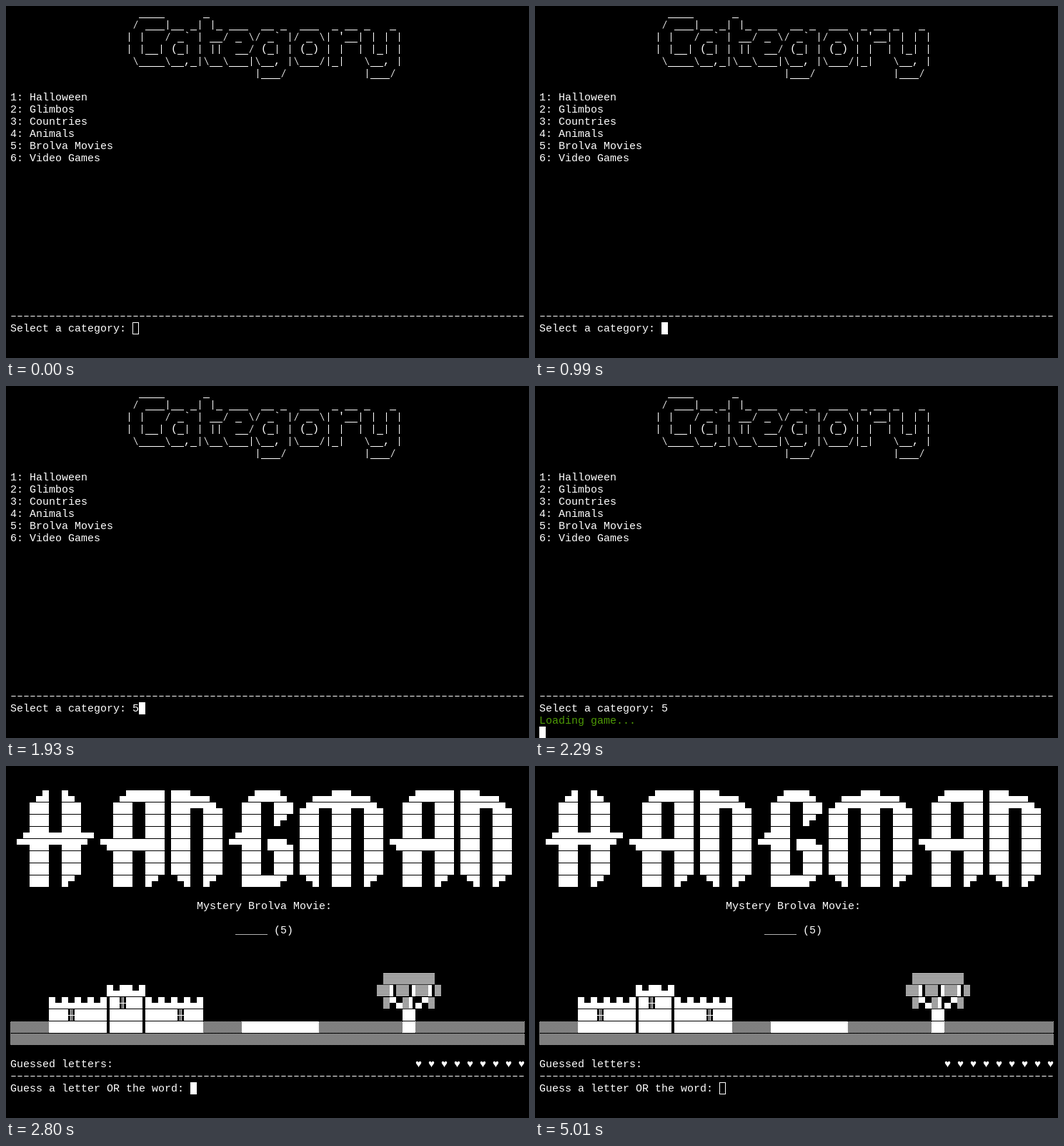
Recreate the animation shown at these times as an HTML page. Size 732 px wide and 492 px high, loop 5.13 s.

```html
<!DOCTYPE html>
<html lang="en">
<head>
<meta charset="utf-8">
<title>Hangman terminal</title>
<style>
  html, body { margin: 0; width: 100%; height: 100%; overflow: hidden; background: #000; }
  svg { display: block; }
  text { font: 15px "Liberation Mono", "Courier New", monospace; fill: #fff; white-space: pre; }
  .block, rect { shape-rendering: crispEdges; }
</style>
</head>
<body>
<svg id="stage" width="732" height="492" viewBox="0 0 732 492">
  <defs>
    <pattern id="ground" width="2" height="2" patternUnits="userSpaceOnUse">
      <path class="block" d="M0 0h1v1h-1zM1 1h1v1h-1z" fill="#fff"/>
    </pattern>
    <pattern id="leaves" width="2" height="2" patternUnits="userSpaceOnUse">
      <rect width="2" height="2" fill="#666"/>
      <path class="block" d="M0 0h2v1h-2z" fill="#ddd"/>
    </pattern>
  </defs>
  <rect width="732" height="492"/>
</svg>
<script>
const CELL_W = 9, CELL_H = 17, LEFT = 6, LOOP = 5130;
const stage = document.getElementById('stage');

function add(parent, tag, attrs = {}) {
  const node = document.createElementNS('http://www.w3.org/2000/svg', tag);
  for (const key in attrs) node.setAttribute(key, attrs[key]);
  return parent.appendChild(node);
}

function print(parent, col, row, content, fill = '#fff') {
  const node = add(parent, 'text', { x: LEFT + col * CELL_W, y: row * CELL_H + 13 });
  node.style.fill = fill;
  node.textContent = content;
  return node;
}

function rule(parent) {
  add(parent, 'path', { d: 'M7.4 433.5H726', stroke: '#fff', 'stroke-dasharray': '6.2 2.8' });
}

// Line-drawing characters as a start point and a relative line inside the cell.
const STROKES = {
  '_': [0, 16.5, 9, 0],
  '|': [4.5, 3, 0, 13],
  '/': [2, 14.5, 5, -11],
  '\\': [2, 3.5, 5, 11]
};

function drawBanner(parent, firstCol, lines) {
  let d = '';
  lines.forEach((line, row) => {
    [...line].forEach((char, col) => {
      if (!STROKES[char]) return;
      const [x, y, dx, dy] = STROKES[char];
      d += `M${LEFT + (firstCol + col) * CELL_W + x} ${row * CELL_H + y}l${dx} ${dy}`;
    });
    print(parent, firstCol, row, line.replace(/[_|/\\]/g, ' '));
  });
  add(parent, 'path', { d, stroke: '#fff', fill: 'none' });
}

// Each block character is a list of [x, y, width, height] inside its cell.
const BLOCKS = {
  '█': [[0, 0, 9, 16]],
  '▀': [[0, 0, 9, 8]],
  '▄': [[0, 8, 9, 8]],
  '▌': [[0, 0, 5, 16]],
  '▐': [[4, 0, 5, 16]],
  '╫': [[3, 0, 1, 16], [5, 0, 1, 16], [0, 8, 9, 1]],
  '░': [[0, 0, 9, 16]],
  '▒': [[0, 0, 9, 16]]
};
const FILLS = { '░': 'url(#ground)', '▒': 'url(#leaves)' };

function drawBlocks(parent, firstRow, lines) {
  const paths = {};
  lines.forEach((line, row) => [...line].forEach((char, col) => {
    const fill = FILLS[char] || '#fff';
    for (const [x, y, w, h] of BLOCKS[char] || []) {
      paths[fill] = (paths[fill] || '') +
        `M${LEFT + col * CELL_W + x} ${(firstRow + row) * CELL_H + y}h${w}v${h}h${-w}z`;
    }
  }));
  for (const fill in paths) add(parent, 'path', { class: 'block', d: paths[fill], fill });
}

const LETTERS = {
  H: ['   ▄█  █▄   ', '  ███  ███  ', '  ███  ███  ', ' ▄███▄▄███▄▄',
      '▀▀███▀▀███▀ ', '  ███  ███  ', '  ███  ███  ', '  ███  █▀   '],
  A: ['   ▄██████', '  ███  ███', '  ███  ███', '  ███  ███',
      '▀█████████', '  ███  ███', '  ███  ███', '  ███  █▀ '],
  N: ['███▄▄▄  ', '███▀▀██▄', ...Array(5).fill('███  ███'), ' ▀█  █▀ '],
  G: ['   ▄████▄ ', '  ███  ███', '  ███  █▀ ', ' ▄███     ',
      '▀▀███ ███▄', '  ███  ███', '  ███  ███', '  ██████▀ '],
  M: ['  ▄▄▄███▄▄▄  ', '▄██▀▀███▀▀██▄', ...Array(5).fill('███  ███  ███'), ' ▀█  ███  █▀ ']
};
const title = LETTERS.H.map((_, row) => ' ' + [...'HANGMAN'].map(c => LETTERS[c][row]).join(' '));

const gap = n => ' '.repeat(n);
const soil = n => '░'.repeat(n);
const scene = [
  gap(58) + '▒▒▒▒▒▒▒▒',
  gap(15) + '█▄██▄█' + gap(36) + '▒▒▌▒▒▐▒▒▌▒',
  gap(6) + '█▄█▄█▄█▄█▐█╫██▌█▄█▄█▄█▄█' + gap(28) + '▒▀▄▒▌▄▀▒',
  gap(6) + '███╫█████▐████▌█████╫███' + gap(31) + '██',
  soil(6) + '█████████▐████▌█████████' + soil(6) + '█'.repeat(12) + soil(13) + '██' + soil(17),
  soil(80)
];

const menu = add(stage, 'g');
drawBanner(menu, 18, [
  '  ____      _',
  ' / ___|__ _| |_ ___  __ _  ___  _ __ _   _',
  "| |   / _` | __/ _ \\/ _` |/ _ \\| '__| | | |",
  '| |__| (_| | ||  __/ (_| | (_) | |  | |_| |',
  ' \\____\\__,_|\\__\\___|\\__, |\\___/|_|   \\__, |',
  '                    |___/            |___/'
]);
['Halloween', 'Glimbos', 'Countries', 'Animals', 'Brolva Movies', 'Video Games']
  .forEach((name, i) => print(menu, 0, 7 + i, `${i + 1}: ${name}`));
rule(menu);
print(menu, 0, 26, 'Select a category:');
const choice = print(menu, 19, 26, '5');
const loading = print(menu, 0, 27, 'Loading game...', '#4e9a06');

const game = add(stage, 'g');
drawBlocks(game, 2, title);
print(game, 29, 11, 'Mystery Brolva Movie:');
print(game, 35, 13, '_____ (5)');
drawBlocks(game, 17, scene);
print(game, 0, 24, 'Guessed letters:');
print(game, 63, 24, Array(9).fill('♥').join(' '));
rule(game);
print(game, 0, 26, 'Guess a letter OR the word:');

const cursor = add(stage, 'rect', { width: 8, height: 16, stroke: '#fff' });

function show(node, visible) {
  node.style.display = visible ? '' : 'none';
}

function placeCursor(col, row, solid) {
  cursor.setAttribute('x', LEFT + col * CELL_W + 0.5);
  cursor.setAttribute('y', row * CELL_H + 0.5);
  cursor.setAttribute('fill', solid ? '#fff' : 'none');
}

function render(t) {
  show(menu, t < 2690);
  show(choice, t >= 1390);
  show(loading, t >= 2290);
  show(game, t >= 2800);
  if (t < 1390) placeCursor(19, 26, t >= 390);
  else if (t < 2290) placeCursor(20, 26, true);
  else if (t < 2690) placeCursor(0, 28, true);
  else if (t < 2800) placeCursor(0, 0, true);
  else placeCursor(28, 26, t < 5010);
}

const start = performance.now();
function tick() {
  render((performance.now() - start) % LOOP);
  requestAnimationFrame(tick);
}
tick();
</script>
</body>
</html>
```
